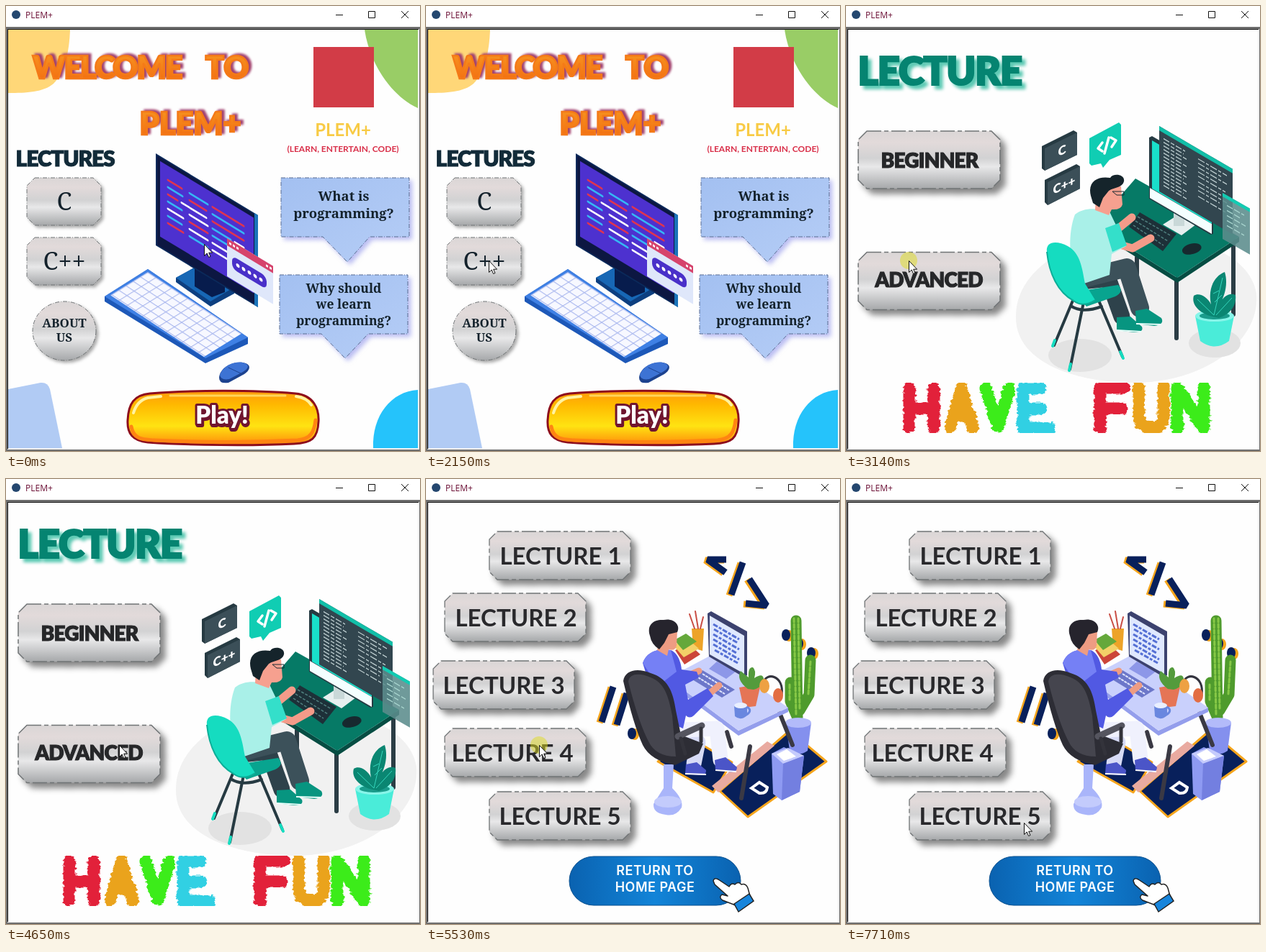
These frames come from a looping animation (575x619 px, 8 s). An HTML page:

```html
<!DOCTYPE html>
<html lang="en">
<head>
<meta charset="utf-8">
<title>PLEM+</title>
<style>
html, body { margin: 0; width: 100%; height: 100%; overflow: hidden; background: #fff; }
svg { display: block; width: 575px; height: 619px; }
text { font-family: Lato, sans-serif; text-anchor: middle; }
.heavy { font-weight: 900; }
.inter text { font-family: Inter, sans-serif; }
.serif text { font-family: "Noto Serif", serif; fill: #14222c; }
.btn { fill: url(#metal); stroke: #707476; stroke-dasharray: 20 4 6 4; filter: drop-shadow(7px 7px 4px #0007); }
.fine { stroke-dasharray: 6 2 1 2; filter: drop-shadow(3px 3px 2px #0005); }
.bubble { fill: url(#sky); stroke: #5b6f92; stroke-dasharray: 6 2 1 2; filter: drop-shadow(4px 4px 3px #7f86e888); }
.line { fill: none; stroke-linecap: round; stroke-linejoin: round; }

.page, .flash, .glow { animation: 8s step-end infinite; }
#home { animation-name: home; }
#levels { animation-name: levels; }
#list { animation-name: list; }
.flash { animation-name: flash; }
.glow { animation-name: glow; }
@keyframes home { 0% { visibility: visible } 38.32%, 100% { visibility: hidden } }
@keyframes levels { 0% { visibility: hidden } 39.2% { visibility: visible } 68.2%, 100% { visibility: hidden } }
@keyframes list { 0% { visibility: hidden } 69.07%, 100% { visibility: visible } }
@keyframes flash {
  0%, 39.2%, 69.07%, 100% { visibility: hidden }
  38.32%, 68.2% { visibility: visible }
}
@keyframes glow {
  0%, 40.82%, 71.57%, 100% { visibility: hidden }
  39.2%, 69.07% { visibility: visible }
}

/* the pointer is sampled about every 70 ms */
#pointer { animation: point 8s infinite; }
@keyframes point {
  0% { transform: translate(275px, 331px); animation-timing-function: step-end }
  11.45% { transform: translate(275px, 331px); animation-timing-function: steps(3, start) }
  14.04% { transform: translate(256px, 328px); animation-timing-function: steps(3, start) }
  16.64% { transform: translate(186px, 335px); animation-timing-function: steps(3, start) }
  19.23% { transform: translate(110px, 347px); animation-timing-function: steps(3, start) }
  21.82% { transform: translate(83px, 352px); animation-timing-function: steps(5, start) }
  28.07% { transform: translate(87px, 354px); animation-timing-function: step-end }
  46.82% { transform: translate(87px, 354px); animation-timing-function: steps(3, start) }
  49.65% { transform: translate(96px, 357px); animation-timing-function: steps(3, start) }
  52.48% { transform: translate(163px, 299px); animation-timing-function: steps(2, start) }
  54.37% { transform: translate(174px, 314px); animation-timing-function: steps(3, start) }
  57.2% { transform: translate(165px, 352px); animation-timing-function: steps(2, start) }
  58.95% { transform: translate(157px, 370px); animation-timing-function: step-end }
  78.95% { transform: translate(157px, 370px); animation-timing-function: steps(3, start) }
  81.54% { transform: translate(198px, 306px); animation-timing-function: steps(3, start) }
  84.13% { transform: translate(274px, 160px); animation-timing-function: steps(2, start) }
  85.86% { transform: translate(288px, 118px); animation-timing-function: steps(4, start) }
  89.32% { transform: translate(222px, 152px); animation-timing-function: steps(3, start) }
  91.95% { transform: translate(188px, 240px); animation-timing-function: steps(2, start) }
  93.7% { transform: translate(185px, 315px); animation-timing-function: steps(4, start) }
  97.2%, 100% { transform: translate(247px, 478px); animation-timing-function: step-end }
}
</style>
</head>
<body>
<svg viewBox="0 0 575 619" xmlns="http://www.w3.org/2000/svg">
<defs>
  <linearGradient id="metal" x2="0" y2="1">
    <stop stop-color="#dad6d6"/><stop offset=".2" stop-color="#e2dada"/><stop offset=".47" stop-color="#d2d2d3"/>
    <stop offset=".62" stop-color="#e8e8e9"/><stop offset="1" stop-color="#a6a8aa"/>
  </linearGradient>
  <linearGradient id="sky" x2="1" y2="1"><stop stop-color="#a3c0f1"/><stop offset="1" stop-color="#b5cdf6"/></linearGradient>
  <linearGradient id="fire" x2="0" y2="1"><stop stop-color="#f79a22"/><stop offset="1" stop-color="#f2690f"/></linearGradient>
  <linearGradient id="gold" x2="0" y2="1">
    <stop stop-color="#ff9a0c"/><stop offset=".25" stop-color="#ffb800"/><stop offset=".65" stop-color="#ffe312"/><stop offset="1" stop-color="#ff8a0a"/>
  </linearGradient>
  <linearGradient id="blue"><stop stop-color="#0a62b0"/><stop offset=".5" stop-color="#1284d8"/><stop offset="1" stop-color="#0a62b0"/></linearGradient>
  <pattern id="keys" width="11" height="10" patternUnits="userSpaceOnUse">
    <path fill="#f7f8ff" d="M0 0H11V10H0Z"/><path fill="none" stroke="#a9b7ee" d="M0 .5H11M.5 0V10"/>
  </pattern>
  <filter id="rough" x="-5%" y="-10%" width="110%" height="120%" color-interpolation-filters="sRGB">
    <feTurbulence type="fractalNoise" baseFrequency=".15 .25" numOctaves="2" seed="4"/>
    <feDisplacementMap in="SourceGraphic" scale="7" xChannelSelector="R" yChannelSelector="G"/>
  </filter>
  <path id="wide" d="M12 0H185L197 12V68L185 80H12L0 68V12Z"/>
  <path id="slim" d="M11 0H185L196 11V56L185 67H11L0 56V11Z"/>
  <path id="small" d="M11 0H92L103 11V55L92 66H11L0 55V11Z"/>
  <path id="tags" d="M417 112L391 112L416 130M440 116L424 161M449 139L473 176L444 173M260 289L244 338M279 298L265 342"/>
  <g id="dots"><ellipse cx="500" cy="217" rx="6" ry="8"/><ellipse cx="518" cy="229" rx="6" ry="8"/><ellipse cx="535" cy="242" rx="6" ry="8"/><ellipse cx="286" cy="354" rx="6" ry="8"/></g>
</defs>

<!-- window -->
<path fill="#fff" d="M0 0H575V619H0Z"/>
<circle cx="14" cy="12" r="6" fill="#24476f"/>
<text x="27" y="17" style="font:12px 'Open Sans',sans-serif;text-anchor:start" fill="#6b0f35">PLEM+</text>
<path fill="none" stroke="#111" d="M458 12.5H468M503.5 7.5H512.5V16.5H503.5ZM549 7L559 17M559 7L549 17"/>
<path fill="#6e6e6e" d="M0 29H575V619H0Z"/>
<path fill="#f2f2f2" d="M2 32H574V617H2Z"/>
<path fill="#161616" d="M2 32H573V33H3V616H2Z"/>
<path fill="#fefefe" d="M3 33H572V615H3Z"/>

<g class="page" id="home">
  <path fill="#ffd778" d="M3 33H89C88 62 82 92 66 108C52 120 28 121 3 121Z"/>
  <path fill="#99cd66" d="M498 33C505 80 535 125 572 142V33Z"/>
  <path fill="#b1cbf4" d="M3 533L48 524Q58 523 61 533L78 615H3Z"/>
  <path fill="#25c3fb" d="M510 615C508 570 535 536 572 534V615Z"/>

  <g class="heavy" font-size="43" fill="url(#fire)" stroke="#f47a18" stroke-width="2.5" style="filter:drop-shadow(4px -2px 1.5px #a2426f)">
    <text x="140" y="101" letter-spacing="-2">WELCOME</text>
    <text x="307" y="101">TO</text>
    <text x="256" y="179">PLEM+</text>
  </g>
  <path fill="#d23c47" d="M427 57H511V141H427Z"/>
  <text x="468" y="181" font-size="24" font-weight="700" fill="#f8cb45">PLEM+</text>
  <text x="468" y="203" font-size="12" font-weight="700" fill="#d9304a">(LEARN, ENTERTAIN, CODE)</text>
  <text class="heavy" x="82" y="223" font-size="30" letter-spacing="-1.2" fill="#122b39" stroke="#122b39">LECTURES</text>

  <g class="serif">
    <use href="#small" class="btn fine" x="29" y="239"/>
    <use href="#small" class="btn fine" x="29" y="322"/>
    <ellipse class="btn fine" cx="81" cy="452" rx="44" ry="41"/>
    <text x="81" y="284" font-size="34">C</text>
    <text x="81" y="367" font-size="34">C++</text>
    <g font-weight="700">
      <text x="81" y="447" font-size="17">ABOUT</text>
      <text x="81" y="467" font-size="17">US</text>
      <path class="bubble" d="M382 239H560V321H505L474 356L440 321H382Z"/>
      <path class="bubble" d="M380 374H558V456H503L471 490L438 456H380Z"/>
      <g font-size="18.5"><text x="469" y="271">What is</text><text x="469" y="295">programming?</text></g>
      <g font-size="17.5"><text x="469" y="399">Why should</text><text x="469" y="421">we learn</text><text x="469" y="444">programming?</text></g>
    </g>
  </g>

  <!-- computer -->
  <path fill="#0d3f80" d="M236 378L265 362L317 391V400L284 418L236 384Z"/>
  <path fill="#1767b5" d="M236 378L265 362L317 391L284 411Z"/>
  <path fill="#071c4d" d="M262 362L304 378V398L286 405L262 390Z"/>
  <g transform="matrix(1 .606 0 1 208 205)">
    <path fill="#0b2a5b" d="M0 0H142V128H0Z"/><path fill="#1a73b9" d="M137 0H142V128H137Z"/>
    <path fill="#0c1742" d="M2 2H137V126H2Z"/><path fill="#4d31cf" d="M6 7H136V112H6Z"/>
    <g class="line" stroke-width="3">
      <path stroke="#e0344f" d="M17 27H36M79 27H122M47 37H70M17 47H30M79 47H122M47 67H72M17 87H38"/>
      <path stroke="#36b7f4" d="M47 27H72M17 37H37M79 37H122M17 57H36M79 57H104M79 67H122M17 77H36M47 87H72"/>
      <path stroke="#fff" d="M36 47H70M47 57H72M110 57H122M17 67H38M47 77H72M79 77H122M79 87H116"/>
    </g>
  </g>
  <g transform="matrix(1 .606 0 1 307 323)">
    <path fill="#dfe7fa" d="M0 0H64V53H0Z"/><path fill="#d6436c" d="M0 0H64V10H0Z"/>
    <path fill="none" stroke="#fff" stroke-width="3" stroke-dasharray="3 2" d="M3 5H16M54 5H62"/>
    <rect x="7" y="20" width="48" height="18" rx="7" fill="#4930c9"/>
    <path class="line" stroke="#fff" stroke-width="5" stroke-dasharray="0 8" d="M15 29H48"/>
  </g>
  <path fill="#1d58b8" d="M137 404L197 366L336 461V470L277 497L137 411Z"/>
  <path fill="#3f80e4" d="M137 404L197 366L336 461L277 490Z"/>
  <path fill="url(#keys)" transform="matrix(1 .66 -1 .62 197 370)" d="M0 0H130V52H0Z"/>
  <path fill="#1c428f" d="M296 517C297 503 314 494 329 496C341 498 340 506 331 512L309 524Q296 526 296 517Z"/>
  <path fill="#3d73d4" d="M297 513C302 500 317 494 329 496C340 499 336 505 329 509L310 519Q298 521 297 513Z"/>
  <path class="line" stroke="#1c428f" d="M309 503L326 511"/>

  <path fill="url(#gold)" stroke="#8d0d1d" stroke-width="3" d="M200 539C260 534 345 534 402 539C427 541 435 560 434 578C433 602 424 608 400 609C340 612 255 611 197 607C176 605 168 595 169 576C170 553 178 541 200 539Z"/>
  <path class="line" stroke="#ff8412" stroke-width="5" d="M174 585C177 603 190 603 205 604C270 607 345 607 405 604C424 602 428 592 430 576"/>
  <path class="line" stroke="#fff3a0" stroke-width="4" d="M177 566Q182 549 197 545L215 543M403 543Q418 545 424 555"/>
  <path class="line" stroke="#ffd65a" stroke-width="3" d="M228 542H388"/>
  <text class="heavy" x="300" y="581" font-size="33" fill="#fff" stroke="#70152f" stroke-width="6" stroke-linejoin="round" paint-order="stroke" style="filter:drop-shadow(1px 2px #70152f)">Play!</text>
</g>

<g class="page" id="levels">
  <text class="heavy" x="130" y="110" font-size="55" letter-spacing="-1.5" fill="#058471" stroke="#058471" stroke-width="2" style="filter:drop-shadow(5px 5px 2px #5cc9b3)">LECTURE</text>
  <use href="#wide" class="btn" x="17" y="174" stroke-width="1.5"/>
  <use href="#wide" class="btn" x="17" y="342.5" stroke-width="1.5"/>
  <g class="heavy" font-size="28" fill="#262729" stroke="#262729" letter-spacing="-.8">
    <text x="116" y="225">BEGINNER</text><text x="115" y="391">ADVANCED</text>
  </g>

  <path fill="#f1f1f1" d="M236 429C238 365 315 318 405 318C490 318 562 348 570 400C576 465 500 524 400 524C305 523 233 490 236 429Z"/>
  <ellipse cx="325" cy="486" rx="44" ry="23" fill="#e2e2e2"/><ellipse cx="512" cy="469" rx="36" ry="20" fill="#e2e2e2"/>
  <g fill="#263a42"><path d="M272 195L316 173L321 176V207L276 229L272 226Z"/><path d="M276 242L320 220L325 223V254L280 277L276 273Z"/></g>
  <g fill="#3b4f58"><path d="M276 198L321 176V207L276 229Z"/><path d="M280 245L325 223V254L280 277Z"/></g>
  <path fill="#10cdb3" d="M338 184L379 162L382 165V207L366 214L357 225L354 219L341 222L338 219Z"/>
  <g class="heavy" fill="#fff">
    <text font-size="17" transform="matrix(1 -.47 0 1 300 207)">C</text>
    <text font-size="17" transform="matrix(1 -.47 0 1 303 255)">C++</text>
  </g>
  <path class="line" stroke="#fff" stroke-width="3.5" d="M356 190L350 198L356 202M365 183L359 205M368 183L375 187L369 196"/>

  <!-- desk -->
  <path class="line" stroke="#2b3d45" stroke-width="6" d="M459 380V462M538 324V429M404 350V376"/>
  <path fill="#064d43" d="M345 306L460 378L546 321V328L460 385L345 313Z"/>
  <path fill="#067a66" d="M402 240L546 321L460 378L345 306Z"/>
  <path fill="#e6efef" d="M440 304L462 290L486 304L466 319Z"/><path fill="#c9d8d8" d="M455 285H470V306H455Z"/>
  <path fill="#263a42" d="M421 183L425 181L510 230V317L506 318L421 268Z"/>
  <path fill="#f4ffff" d="M422 253L508 303V317L422 267Z"/>
  <path fill="#19dfca" d="M425 187L508 235V303L425 254Z"/>
  <g transform="matrix(1 .585 0 1 435 167)">
    <path fill="#32464f" d="M0 0H102V91H0Z"/><path fill="#11bfa8" d="M0 0H102V6H0Z"/>
    <g fill="none" stroke="#c2d2d4" stroke-width="1.4">
      <path stroke-dasharray="8 2 5 2" d="M6 14H36M6 19H34M6 24H40M6 29H32M6 34H38M6 39H30M6 44H36M6 49H40M6 54H34M6 59H38M6 64H30M6 69H40M6 74H34M6 79H38"/>
      <path stroke-dasharray="9 2 4 2" d="M54 14H94M54 20H86M54 26H94M54 32H80M54 38H92M54 46H88M54 52H94M54 58H84M54 66H92"/>
    </g>
  </g>
  <g transform="matrix(1 .57 0 1 523 260)">
    <path fill="#5c8d8d" opacity=".88" d="M0 0H38V64H0Z"/><path fill="#12cbb2" d="M0 0H38V5H0Z"/>
    <path fill="none" stroke="#a9d5cf" stroke-width="1.5" stroke-dasharray="8 2" d="M6 14H30M6 21H24M6 28H32M6 35H22M6 42H30"/>
  </g>
  <path fill="#1d3038" d="M393 307L408 287L459 317L440 341Z"/>
  <path fill="none" stroke="#4f7f7e" stroke-width="1.5" stroke-dasharray="4 2" d="M405 293L452 320M402 299L447 327M399 305L441 333"/>
  <path fill="#17292f" d="M467 339C470 332 482 328 490 331C497 335 493 341 485 344C477 347 466 347 467 339Z"/>

  <!-- person and chair -->
  <g class="line" stroke="#263a42" stroke-width="4"><path d="M317 405L289 472M330 412L311 505M349 405L384 488M312 417Q328 428 355 418"/></g>
  <path class="line" stroke="#16dcc0" stroke-width="4" d="M290 465L287 473M312 498L310 507M381 481L385 490"/>
  <path class="line" stroke="#2e424b" stroke-width="23" d="M328 383L364 379L383 432"/>
  <path class="line" stroke="#3c515a" stroke-width="26" d="M330 379L390 364L408 420"/>
  <path fill="#079580" d="M376 433L395 432L411 446Q414 454 400 454L376 451ZM402 424L418 421L438 434Q443 443 428 445L403 442Z"/>
  <path fill="none" stroke="#e9fffb" stroke-width="2" d="M376 451L410 453M403 442L438 443"/>
  <path class="line" stroke="#f49b89" stroke-width="11" d="M374 313L397 294M380 332L398 337L423 323"/>
  <path fill="#a9f0e8" d="M318 290C329 281 346 280 366 286L389 334L369 345L366 374L322 389C309 355 308 316 318 290Z"/>
  <path fill="#34dfca" d="M360 309L379 302L390 333L370 342Z"/>
  <path fill="#f6a08f" d="M347 264L356 250L382 251L384 276Q382 284 369 283L365 291L346 284Z"/>
  <path fill="#15242b" d="M340 264C335 244 350 236 367 239C371 232 388 234 386 244C384 253 372 252 365 257L357 267L352 280L343 274Z"/>
  <path fill="none" stroke="#1b2b32" d="M370 258H386V263H376Z"/>
  <path fill="#08a48f" d="M316 398L378 388Q387 397 374 404L334 418Z"/>
  <path fill="#15dcc0" d="M279 342C277 327 293 326 308 334C326 344 328 366 332 386L346 409Q329 420 316 410C294 398 282 372 279 342Z"/>
  <path fill="none" stroke="#0cae98" stroke-width="2" d="M279 342C282 372 294 398 316 410Q329 420 346 409"/>

  <!-- plant -->
  <path fill="#4aecd9" d="M485 431H539L532 466Q512 481 492 466Z"/>
  <ellipse cx="512" cy="431" rx="27" ry="8" fill="#87f5e9"/><ellipse cx="512" cy="431" rx="21" ry="5" fill="#1a9c8b"/>
  <path fill="#0a8672" d="M509 432C492 428 479 416 483 403C491 398 502 405 507 415C502 391 513 375 526 370C531 386 526 404 519 415C523 404 533 398 541 402C543 420 530 430 518 434Z"/>
  <path fill="none" stroke="#36d7bd" d="M488 408L511 430L523 378M514 430L536 406M510 400L518 396M512 412L522 402"/>

  <g class="line" stroke-width="17" filter="url(#rough)">
    <path stroke="#e2213a" d="M88 532V586M122 532V586M88 560H122M353 588V531H387M353 560H383"/>
    <path stroke="#eaa31c" d="M145 586L160 532L176 586M151 569H173M407 530V572C407 592 441 592 441 572V530"/>
    <path stroke="#3cec1a" d="M194 532L211 585L227 532M460 588V531L497 587V530"/>
    <path stroke="#31d0e3" d="M270 532H246V587H283M246 560H270"/>
  </g>
</g>

<g class="page" id="list">
  <g stroke-width="1.3">
    <use href="#slim" class="btn" x="88" y="73"/><use href="#slim" class="btn" x="26" y="159"/><use href="#slim" class="btn" x="10" y="253"/>
    <use href="#slim" class="btn" x="26" y="347"/><use href="#slim" class="btn" x="88" y="435"/>
  </g>
  <g font-size="33" font-weight="700" fill="#29292c">
    <text x="187" y="119">LECTURE 1</text><text x="125" y="205">LECTURE 2</text><text x="108" y="299">LECTURE 3</text>
    <text x="120" y="393">LECTURE 4</text><text x="186" y="481">LECTURE 5</text>
  </g>

  <g fill="none" stroke-width="9" stroke-linejoin="bevel">
    <use href="#tags" stroke="#f6a51c" x="-3" y="1"/><use href="#tags" stroke="#08205b"/>
  </g>
  <use href="#dots" fill="#f6a51c" x="4" y="1"/><use href="#dots" fill="#08205b"/>

  <!-- floor -->
  <g fill="#08205b" stroke="#f6a51c" stroke-width="3" stroke-linejoin="round"><path d="M322 393L370 362L425 394L399 436Z"/><path d="M408 434L505 350L556 393L447 470Z"/></g>
  <path fill="#e9aaa0" d="M397 427L474 365L484 371L406 436Z"/>
  <path fill="none" stroke="#fff" stroke-width="4" d="M452 430L463 422L474 429Q473 438 463 437Z"/>

  <!-- cactus, pot, bin -->
  <path class="line" stroke="#4f9b2d" stroke-width="15" d="M514 197L516 332M506 283V309L515 330M534 252L532 300L519 322"/>
  <path class="line" stroke="#86c846" stroke-width="3" stroke-dasharray="5 3" d="M511 194L514 328M517 194L519 320M505 286V308M534 254L531 299"/>
  <path fill="#8490ee" d="M500 339H535L530 378Q517 387 505 378Z"/><ellipse cx="517" cy="339" rx="18" ry="7" fill="#b3bbfa"/>
  <path fill="#8e9af2" d="M480 382L497 373L525 385L519 435L494 447L482 438Z"/><path fill="#c5cbfc" d="M480 382L503 374L525 385L496 396Z"/>
  <path fill="#fff" d="M487 383L501 376L514 386L497 392Z"/><path fill="#737fe0" d="M496 396L525 385L519 435L494 447Z"/>

  <!-- desk -->
  <path class="line" stroke="#3a3944" stroke-width="6" d="M450 372L438 444M491 325L509 370M418 352L424 372"/>
  <path fill="#949eec" d="M336 277L434 350L503 318V324L434 357L336 284Z"/>
  <path fill="#c9d0fc" d="M336 277L398 244L503 318L434 350Z"/>
  <path fill="#8d97e8" d="M404 254L430 268L417 278L393 264Z"/>
  <path fill="#3c426f" d="M391 187L396 184L446 212V273L442 276L393 247Z"/>
  <path fill="#dfe8ff" d="M394 190L442 218V271L394 244Z"/>
  <path fill="none" stroke="#5570d4" stroke-width="3" stroke-dasharray="7 2 4 2" d="M399 202L435 223M400 209L433 228M399 216L435 237M399 223L431 242M399 230L435 251M401 238L433 256"/>
  <path fill="#6c77c9" d="M370 279L384 266L429 293L411 304Z"/>
  <path fill="none" stroke="#e2e7ff" stroke-width="2" stroke-dasharray="4 1" d="M384 271L421 294M378 276L415 299"/>
  <path fill="#eda328" d="M369 208H386L384 239L371 235Z"/><path class="line" stroke="#c94e45" stroke-width="2" d="M373 208L366 188M378 208L374 184M381 208L385 192"/>
  <path fill="#cc4539" d="M346 238L366 230L381 244L359 258Z"/><path fill="#f3d168" d="M343 231L363 222L379 236L358 248Z"/><path fill="#65a83b" d="M345 224L361 215L376 226L357 238Z"/>
  <path fill="#e57556" d="M435 290L465 285L458 316L441 318Z"/><path fill="#549b3c" d="M447 292Q430 279 437 267L448 276Q447 261 454 262Q459 266 456 277Q468 269 469 278Q469 289 455 293Z"/>
  <path fill="#6987df" d="M428 315H446V329Q437 337 429 330Z"/><ellipse cx="437" cy="315" rx="9" ry="4" fill="#e9efff"/><path fill="none" stroke="#6987df" stroke-width="3" d="M446 317Q454 322 445 328"/>
  <path fill="none" stroke="#33333e" stroke-width="3" d="M469 283C472 268 498 273 494 300"/><ellipse cx="470" cy="288" rx="7" ry="10" fill="#eea143"/><ellipse cx="489" cy="301" rx="7" ry="10" fill="#e36d43"/>

  <!-- person and chair -->
  <path fill="#a9b5fa" d="M330 397H344L342 430Q358 446 355 457Q347 470 333 467Q315 465 316 452L330 430Z"/>
  <ellipse cx="336" cy="449" rx="19" ry="8" fill="#c3cbfc"/>
  <path class="line" stroke="#d7dbf6" stroke-width="21" d="M362 360L378 366L372 396"/><path class="line" stroke="#f0f1fd" stroke-width="21" d="M360 349L404 347L409 391"/>
  <path fill="#4b55c8" d="M361 397L376 394L389 405Q390 413 378 412L360 410ZM401 391L416 387L432 401Q432 410 418 407L402 405Z"/>
  <path fill="none" stroke="#fff" stroke-width="2" d="M360 410L389 411M402 405L431 407"/>
  <path class="line" stroke="#ee9c83" stroke-width="9" d="M358 276L379 267M386 305L407 287"/>
  <path fill="#5159e3" d="M301 256C306 242 319 235 340 238C350 242 354 255 355 265L376 268L379 276L360 286L364 307L391 291L399 302L372 329Q366 334 361 329L357 347L325 333Z"/>
  <path fill="#7580f5" d="M301 256C306 242 319 235 340 238L348 268L322 288Z"/>
  <path fill="#ee9c83" d="M325 221L335 210L349 211L348 232Q346 240 337 237L335 246L321 238Z"/>
  <path fill="#26242d" d="M311 218C306 202 317 195 330 196C344 193 354 203 349 213L337 216L331 228L324 237Q313 230 311 218Z"/>
  <path fill="#2d2d35" d="M274 281C276 266 293 262 312 270C335 277 343 294 347 322L354 356L385 368L379 382L346 398Q312 392 301 370Q288 342 274 281Z"/>
  <path fill="#45454e" d="M281 282C282 270 297 269 312 276C331 283 337 302 342 329L347 386Q319 386 309 365Q295 338 281 282Z"/>
  <path class="line" stroke="#55555f" stroke-width="9" d="M350 358L383 343"/><path class="line" stroke="#33333b" stroke-width="5" d="M354 361L360 382M382 347V365"/>

  <rect x="199" y="525" width="238" height="68" rx="34" fill="url(#blue)" stroke="#0b518f"/>
  <g class="inter" font-size="18" font-weight="600" letter-spacing=".5" fill="#fff">
    <text x="318" y="551">RETURN TO</text><text x="318" y="574">HOME PAGE</text>
  </g>
  <path fill="#fff" stroke="#222" stroke-width="1.5" stroke-linejoin="round" d="M399 559Q400 554 406 557L421 567Q424 561 429 564Q434 559 438 564Q444 562 447 569L450 580L430 593L412 586Q406 582 411 578L419 580L401 564Z"/>
  <path fill="#1785dc" stroke="#222" stroke-width="1.5" d="M428 591L449 577L455 587L434 602Z"/>
</g>

<g id="pointer">
  <circle class="glow" r="12" fill="#dedb20" opacity=".5"/>
  <path fill="#fff" stroke="#111" d="M.5 .5V16.5L4.2 13L6.6 18.5L9 17.5L6.7 12.2H11.6Z"/>
  <circle class="flash" r="12" fill="#ff0" opacity=".55"/>
</g>
</svg>
</body>
</html>
```
